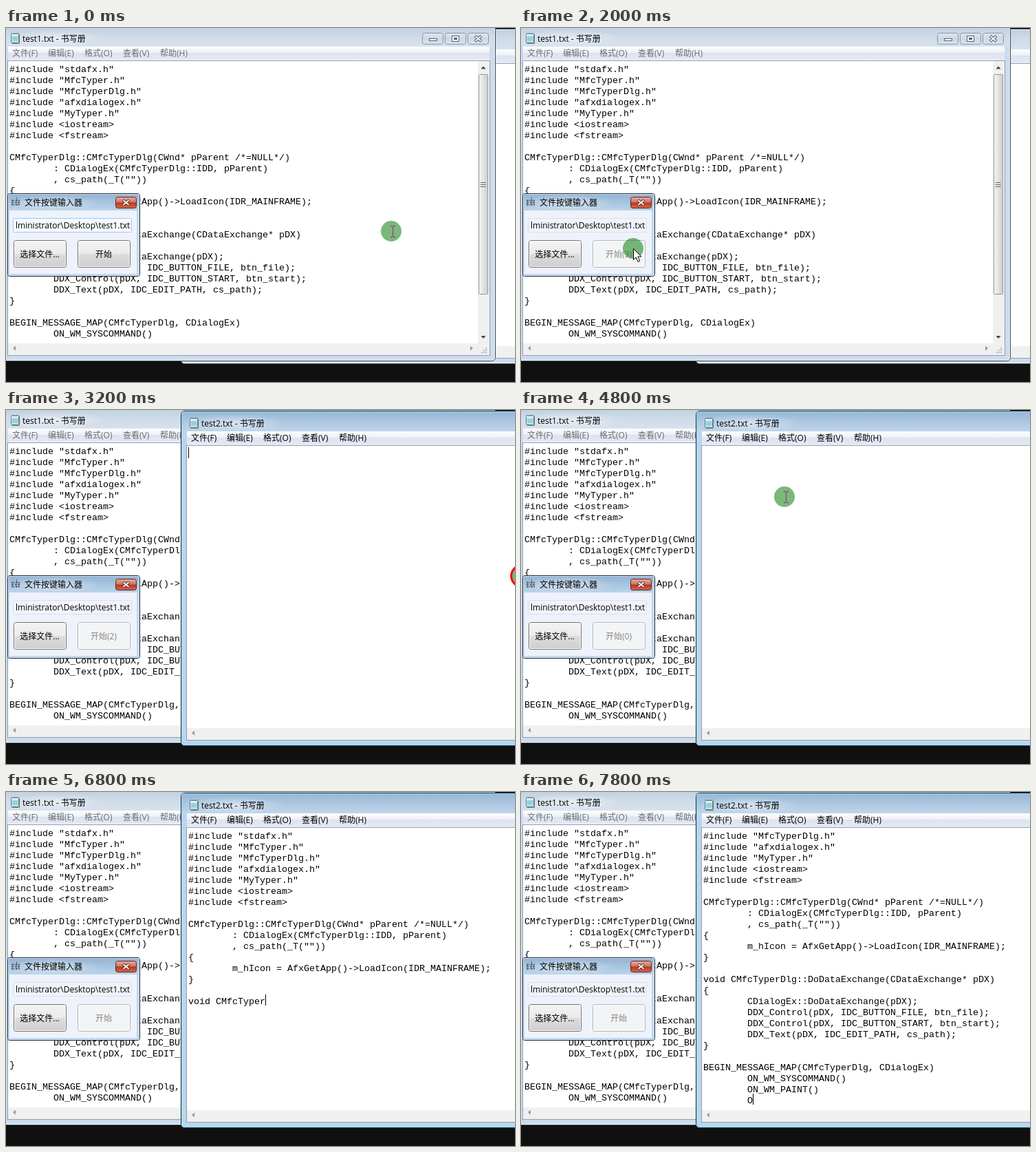
An HTML page that plays this animation: 740x514 px, repeating every 8000 ms.

```html
<!DOCTYPE html>
<html lang="zh">
<head>
<meta charset="utf-8">
<style>
html, body { margin: 0; width: 100%; height: 100%; overflow: hidden; background: #101010; }
svg { display: block; width: 740px; height: 514px; }
text { font: 12px "Open Sans", "Noto Sans CJK SC", "Noto Sans CJK", sans-serif; white-space: pre; }
.code text { font: 13.333px "Liberation Mono", "DejaVu Sans Mono", monospace; }
</style>
</head>
<body>
<svg id="stage" viewBox="0 0 740 514"></svg>
<script>
const LOOP = 8000, STEP = 200, ROWS = 25;
const CLICK = 1800, FRONT = 3200, TYPING = 5300;

const doc = `#include "stdafx.h"
#include "MfcTyper.h"
#include "MfcTyperDlg.h"
#include "afxdialogex.h"
#include "MyTyper.h"
#include <iostream>
#include <fstream>

CMfcTyperDlg::CMfcTyperDlg(CWnd* pParent /*=NULL*/)
\t: CDialogEx(CMfcTyperDlg::IDD, pParent)
\t, cs_path(_T(""))
{
\tm_hIcon = AfxGetApp()->LoadIcon(IDR_MAINFRAME);
}

void CMfcTyperDlg::DoDataExchange(CDataExchange* pDX)
{
\tCDialogEx::DoDataExchange(pDX);
\tDDX_Control(pDX, IDC_BUTTON_FILE, btn_file);
\tDDX_Control(pDX, IDC_BUTTON_START, btn_start);
\tDDX_Text(pDX, IDC_EDIT_PATH, cs_path);
}

BEGIN_MESSAGE_MAP(CMfcTyperDlg, CDialogEx)
\tON_WM_SYSCOMMAND()
\tON_WM_PAINT()
\tON_WM_QUERYDRAGICON()`;

const rect = (x, y, w, h, fill, extra = '') =>
  `<rect x="${x}" y="${y}" width="${w}" height="${h}" fill="${fill}" ${extra}/>`;
const box = (x, y, w, h, fill, stroke, r = 0, extra = '') =>
  rect(x + .5, y + .5, w - 1, h - 1, fill, `stroke="${stroke}" rx="${r}" ${extra}`);
const path = (d, stroke, extra = '') => `<path d="${d}" fill="none" stroke="${stroke}" ${extra}/>`;
const label = (x, y, s, fill = '#000', extra = '') => `<text x="${x}" y="${y}" fill="${fill}" ${extra}>${s}</text>`;
const gradient = (id, ...stops) => `<linearGradient id="${id}" x2="0" y2="1">` +
  stops.map(([o, c]) => `<stop offset="${o}" stop-color="${c}"/>`).join('') + '</linearGradient>';

const defs = '<defs>' +
  gradient('idle', [0, '#c0cfdf'], [.5, '#cfdbe8'], [1, '#d7e2ee']) +
  gradient('active', [0, '#98b6d5'], [.5, '#acc6e0'], [1, '#bfd5eb']) +
  gradient('menu', [0, '#fcfdfe'], [.45, '#eef1f8'], [.5, '#dde3f0'], [1, '#e3e8f4']) +
  gradient('button', [0, '#f3f3f3'], [.48, '#ebebeb'], [.52, '#dcdcdc'], [1, '#cecece']) +
  gradient('caption', [0, '#dfe8f1'], [.5, '#cbd8e6'], [1, '#d9e4ef']) +
  gradient('close', [0, '#e6aa9c'], [.48, '#d07360'], [.52, '#b93521'], [1, '#d3694f']) +
  gradient('dialogBar', [0, '#93b3d3'], [1, '#bcd4eb']) +
  '<radialGradient id="halo"><stop stop-color="#fff" stop-opacity=".5"/>' +
  '<stop offset="1" stop-color="#fff" stop-opacity="0"/></radialGradient>' +
  '<linearGradient id="thumb"><stop stop-color="#f4f4f4"/><stop offset=".5" stop-color="#e3e3e4"/>' +
  '<stop offset="1" stop-color="#cbccce"/></linearGradient></defs>';

const halo = (cx, cy, rx, ry) => `<ellipse cx="${cx}" cy="${cy}" rx="${rx}" ry="${ry}" fill="url(#halo)"/>`;

function noteIcon() {
  return box(7, 8, 12, 14, '#b9e3ee', '#5b8797', 1) + rect(8, 9, 10, 2, '#e9f3f5') +
    path('M9 13.5h8M9 15.5h8M9 17.5h8', '#79bccd') + path('M19.5 9v13.5h-11', '#7d7350') +
    path('M8 7.5h11', '#71808a', 'stroke-dasharray="1 1"');
}

function scrollbars() {
  const grip = [0, 1, 2].map(i => path(`M689.5 ${224.5 + 3 * i}h8`, '#6b6b6b')).join('');
  let dots = '';
  for (let r = 0; r < 3; r++)
    for (let c = 2 - r; c < 3; c++) dots += rect(691 + 3 * c, 464 + 3 * r, 2, 2, '#b8b8b8');
  return rect(686, 48, 17, 410, '#f0f0f0') + rect(3, 458, 700, 17, '#f0f0f0') +
    box(687, 67, 14, 320, 'url(#thumb)', '#979797', 1) + grip + dots +
    '<path d="M690.500 59.500h7l-3.500-4zM690.500 447h7l-3.500 4z" fill="#444"/>' +
    '<path d="M14 461.500v7l-4-3.500zM675 461.500v7l4-3.500z" fill="#999"/>';
}

function captionButtons() {
  return [605, 638, 671].map(x => box(x, 7, 31, 17, 'url(#caption)', '#8796a8', 3)).join('') +
    box(615, 15, 12, 4, '#fff', '#555f6c') + box(648, 11, 11, 9, '#fff', '#555f6c') +
    rect(651, 14, 5, 3, '#555f6c') + path('M682 11.500l9 8m0-8l-9 8', '#555f6c', 'stroke-width="4"') +
    path('M682.500 12l8 7m0-7l-8 7', '#fff', 'stroke-width="1.800"');
}

const menus = [[9, '文件(F)'], [61, '编辑(E)'], [114, '格式(O)'], [170, '查看(V)'], [224, '帮助(H)']];

function notepad(id, dx, dy, file) {
  const rows = Array.from({ length: ROWS }, (_, i) => label(5, 64 + 16 * i, '')).join('');
  return `<g id="${id}" transform="translate(${dx} ${dy})">` +
    box(-6, -3, 718, 487, '#cddcec', '#3d4650', 5, 'class="frame"') +
    rect(-5, -2, 716, 29, 'url(#idle)', 'rx="4" class="bar"') +
    box(-5, -2, 716, 485, 'none', '#edf4fb', 4, 'class="glow"') +
    halo(72, 15, 75, 13) + noteIcon() + label(24, 20, `${file} - 书写册`) + captionButtons() +
    rect(3, 27, 700, 19, 'url(#menu)') + path('M3 46.500h700', '#f2f4f8') +
    `<g class="menu" fill="#6d6d6d">${menus.map(([x, s]) => `<text x="${x}" y="41">${s}</text>`).join('')}</g>` +
    box(2, 47, 702, 429, '#fff', '#8f9daf') + scrollbars() +
    `<g class="code">${rows}</g>` + rect(5, 50, 1, 16, '#000', 'class="caret" visibility="hidden"') + '</g>';
}

function dialog() {
  const keys = path('M8 250.500h5m1 0h6M8 253.500h4m1 0h7M8 256.500h5m1 0h6', '#4c5966', 'stroke-width="2" stroke-dasharray="3 1"');
  return box(2, 240, 193, 121, '#bfd8f0', '#20262d', 3) + rect(3, 241, 191, 24, 'url(#dialogBar)', 'rx="2"') +
    box(3, 241, 191, 119, 'none', '#d3e7f8', 2) + halo(68, 254, 70, 12) +
    rect(5, 265, 185, 92, '#eef2fb') + keys +
    path('M15.500 249v-3', '#4c5966') + label(27, 258, '文件按键输入器') +
    box(159, 245, 31, 17, 'url(#close)', '#5d2a26', 3) +
    path('M170 250l9 7m0-7l-9 7', '#5d2a26', 'stroke-width="4"') +
    path('M170.500 250.300l8 6.400m0-6.400l-8 6.400', '#fff', 'stroke-width="2"') +
    box(10, 276, 173, 21, '#f6f9fe', '#a6c8ea', 1, 'id="edit"') +
    label(14, 291, 'lministrator\\Desktop\\test1.txt') +
    box(11, 308, 77, 40, 'url(#button)', '#707070', 3) + box(12, 309, 75, 38, 'none', '#fbfbfb', 2) +
    label(49, 333, '选择文件...', '#000', 'text-anchor="middle"') +
    box(104, 308, 77, 40, 'url(#button)', '#707070', 3, 'id="start"') + box(105, 309, 75, 38, 'none', '#fbfbfb', 2) +
    label(142, 333, '', '#000', 'id="startText" text-anchor="middle"');
}

const pointer = '<g id="pointer"><circle r="15" fill="#007800" fill-opacity=".52"/>' +
  '<circle id="ring" r="15.500" fill="none" stroke="#f00" stroke-width="3"/>' +
  path('M-1 -7.500h3m1 0h3M2.500 -7v15M-1 8.500h3m1 0h3', '#96409a', 'id="beam" stroke-width="1.300"') +
  '<path id="arrow" d="M.5 .5v16l3.700-3.500 2.800 6.500 2.700-1.200-2.800-6.300h5z" fill="#fff" stroke="#000"/></g>';

const stage = document.getElementById('stage');
stage.innerHTML = defs + rect(0, 0, 740, 514, '#101010') + '<g id="windows">' +
  notepad('second', 260, 4, 'test2.txt') + notepad('first', 0, 0, 'test1.txt') + '</g>' + dialog() + pointer;

const $ = s => stage.querySelector(s);
const set = (s, attrs) => Object.entries(attrs).forEach(([k, v]) => $(s).setAttribute(k, v));
const show = (s, on) => set(s, { visibility: on ? 'inherit' : 'hidden' });

function writeLines(id, lines) {
  document.querySelectorAll(`#${id} .code text`).forEach((el, i) => {
    el.textContent = (lines[i] || '').replace('\t', ' '.repeat(8));
  });
}

// Interpolates [time, ...values] keys.
function track(keys, t, ease = k => k) {
  const i = keys.findIndex(k => k[0] > t);
  if (i < 0) return keys[keys.length - 1].slice(1);
  if (i === 0) return keys[0].slice(1);
  const a = keys[i - 1], b = keys[i], k = ease((t - a[0]) / (b[0] - a[0]));
  return a.slice(1).map((v, j) => v + (b[j + 1] - v) * k);
}

const smooth = k => k * k * (3 - 2 * k);
const route = [[0, 560, 295], [1200, 178, 310], [1600, 163, 320], [2400, 163, 320],
  [3200, 750, 241], [3600, 394, 140], [4400, 383, 126]];
const typed = [[TYPING, 0], [6200, 186], [6800, 333], [7800, 625]];

function drawWindows(t) {
  const active = t >= FRONT;
  $('#windows').append($(active ? '#second' : '#first'));
  set('#second .bar', { fill: `url(#${active ? 'active' : 'idle'})` });
  set('#second .frame', { fill: active ? '#bcd5ee' : '#cddcec', stroke: active ? '#25303b' : '#3d4650' });
  set('#second .glow', { stroke: active ? '#7fdcf6' : '#edf4fb' });
  set('#second .menu', { fill: active ? '#000' : '#6d6d6d' });

  const lines = doc.slice(0, Math.round(track(typed, t)[0])).split('\n');
  const last = lines[lines.length - 1];
  const view = lines.slice(-ROWS);
  writeLines('second', view);
  const column = last.replace('\t', ' '.repeat(8)).length;
  set('#second .caret', { x: 5 + 8 * column, y: 50 + 16 * (view.length - 1) });
  const blinkOn = Math.floor((t - 3080) / 530) % 2 === 0;
  show('#second .caret', active && (t >= TYPING || blinkOn));
}

function drawDialog(t) {
  const off = t >= CLICK;
  const counting = off && t < 5200;
  $('#startText').textContent = '开始' + (counting ? `(${3 - Math.floor((t - CLICK) / 1000)})` : '');
  set('#startText', { fill: off ? '#858585' : '#000' });
  set('#start', { fill: off ? '#f3f4f6' : 'url(#button)', stroke: off ? '#b3b7ba' : '#707070' });
  set('#edit', { stroke: off ? '#d9e1ee' : '#a6c8ea', fill: off ? '#f0f3fb' : '#f6f9fe' });
}

function drawPointer(t) {
  const [x, y] = track(route, t, smooth);
  const arrow = t > 1200 && x < 195;
  set('#pointer', { transform: `translate(${x} ${y})` });
  show('#pointer', t < TYPING);
  show('#arrow', arrow);
  show('#beam', !arrow);
  show('#ring', t === CLICK || t === FRONT);
}

let shown = -1;
function render(time) {
  const t = Math.floor(time % LOOP / STEP) * STEP;
  if (t !== shown) {
    shown = t;
    drawWindows(t);
    drawDialog(t);
    drawPointer(t);
  }
}

writeLines('first', doc.split('\n').slice(0, ROWS));
const begin = performance.now();
function tick() {
  render(performance.now() - begin);
  requestAnimationFrame(tick);
}
tick();
</script>
</body>
</html>
```
